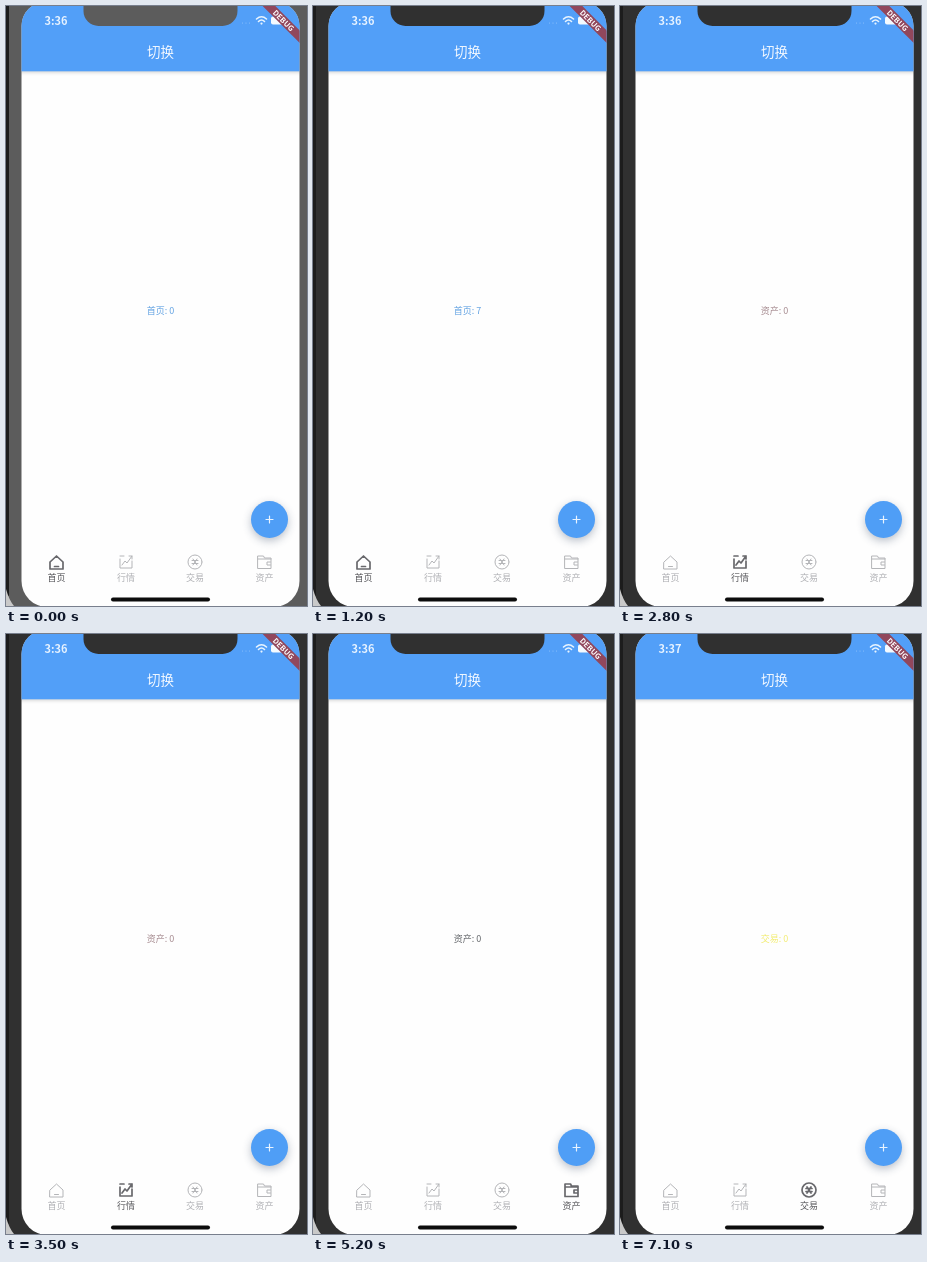
An HTML page with a canvas for the animation above (7200 ms loop, 301 by 600 pixels).

```html
<!DOCTYPE html>
<html lang="zh">
<head>
<meta charset="utf-8">
<style>
html, body { margin: 0; width: 100%; height: 100%; overflow: hidden; background: #303030; }
canvas { display: block; width: 301px; height: 600px; filter: blur(.5px); }
</style>
</head>
<body>
<canvas id="stage" width="301" height="600"></canvas>
<script>
const ctx = document.getElementById('stage').getContext('2d');
const LOOP = 7200;
const FONT = '"Noto Sans CJK SC", "Noto Sans CJK", "Noto Sans", sans-serif';
const BLUE = '#529ff8';

const tabs = [
  { name: '首页', x: 50.5, color: '#62a2e2' },
  { name: '行情', x: 120, color: '#a58a8f', body: '资产: 0' },
  { name: '交易', x: 189, color: '#f2ec70', body: '交易: 0' },
  { name: '资产', x: 258.5, color: '#626569', body: '资产: 0' }
];
const taps = [[0, 0], [2250, 1], [3700, 2], [4700, 3], [6080, 0], [6400, 1], [6620, 2]];

const clamp = v => Math.max(0, Math.min(1, v));

function text(str, x, y, size, color, weight = 400, align = 'center') {
  ctx.font = `${weight} ${size}px ${FONT}`;
  ctx.textAlign = align;
  ctx.textBaseline = 'middle';
  ctx.fillStyle = color;
  ctx.fillText(str, x, y);
}

function disc(x, y, r, color) {
  ctx.fillStyle = color;
  ctx.beginPath();
  ctx.arc(x, y, r, 0, Math.PI * 2);
  ctx.fill();
}

function box(x, y, w, h, r, color) {
  ctx.fillStyle = color;
  ctx.beginPath();
  ctx.roundRect(x, y, w, h, r);
  ctx.fill();
}

function stroke(path, color, width) {
  ctx.strokeStyle = color;
  ctx.lineWidth = width;
  ctx.lineJoin = ctx.lineCap = 'round';
  ctx.stroke(new Path2D(path));
}

// Icon paths are centred on 0,0
const icons = [
  'M-6.5 0 L0 -6 L6.5 0 V7 H-6.5 Z M-2 4.5 H2',
  'M-6 -6 H-2 M-6 -3 V6 H6 V-1 M-4 3 L-1 -1 L1 1 L6 -6 M3 -6 H6 V-3',
  'M7 0 A7 7 0 1 1 -7 0 A7 7 0 1 1 7 0 M-3 -1.5 H3 M-3 1.5 H3 M-2 -3 L2 3 M2 -3 L-2 3',
  'M-6.5 -6 H-1 L0 -4 H6.5 V6.5 H-6.5 Z M-6.5 -3 H6.5 M6 0 H2.5 V3 H6'
];

function drawNav(active, previous, age) {
  const labelled = age > 250 ? active : previous;
  tabs.forEach((tab, i) => {
    const on = i === active;
    ctx.save();
    ctx.translate(tab.x, 556);
    stroke(icons[i], on ? '#68686c' : '#b4b5b8', on ? 1.7 : 1);
    ctx.restore();
    const dark = i === labelled;
    text(tab.name, tab.x, 571.3, 9, dark ? '#58585c' : on ? '#909094' : '#b0b1b5', dark ? 500 : 400);
  });
}

function drawRipple(tab, age) {
  if (age > 480) return;
  const r = 22 * (1 - Math.pow(1 - clamp(age / 200), 2));
  const alpha = 0.065 * (1 - clamp((age - 250) / 230));
  disc(tab.x, 563.5, r, `rgba(0,0,10,${alpha})`);
}

function drawStatus(t) {
  text(t < 6700 ? '3:36' : '3:37', 38.5, 14.5, 11, '#e6f2ff', 600, 'left');
  for (let i = 0; i < 3; i++) disc(236.5 + i * 3.5, 17, 0.6, '#8dc0fa');
  stroke('M250.5 13 Q255.5 8.5 260.5 13 M252.5 15.5 Q255.5 12.5 258.5 15.5', '#e8f4ff', 1.6);
  disc(255.5, 17.6, 1.1, '#e8f4ff');
  box(265, 10.5, 15, 8, 2, '#f4faff');
}

function drawBanner() {
  ctx.save();
  ctx.translate(277.5, 14.5);
  ctx.rotate(Math.PI / 4);
  ctx.fillStyle = '#91475c';
  ctx.fillRect(-40, -4.5, 80, 9);
  text('DEBUG', 0, 0, 7.5, '#fff', 700);
  ctx.restore();
}

function drawFab() {
  ctx.save();
  ctx.shadowColor = 'rgba(40,60,90,.32)';
  ctx.shadowBlur = 9;
  ctx.shadowOffsetY = 3;
  disc(263.5, 513.5, 18.5, '#4f9ef6');
  ctx.restore();
  stroke('M260 513.5 H267 M263.5 510 V517', '#e8f3ff', 1.2);
}

function drawPhone(bezel) {
  ctx.fillStyle = bezel;
  ctx.fillRect(0, 0, 301, 600);
  ctx.fillStyle = '#1c1c1c';
  ctx.fillRect(0, 0, 3, 590);
  ctx.fillStyle = '#c9c9c9';
  ctx.beginPath();
  ctx.moveTo(0, 583);
  ctx.quadraticCurveTo(3, 594, 8, 600);
  ctx.lineTo(0, 600);
  ctx.fill();
}

function draw(t) {
  const index = taps.filter(([time]) => time <= t).length - 1;
  const [start, active] = taps[index];
  const previous = index ? taps[index - 1][1] : active;
  const age = index ? t - start : 1000;
  const tab = tabs[active];
  const tone = Math.round(92 - 44 * clamp((t - 50) / 250));
  const bezel = `rgb(${tone},${tone},${tone})`;
  drawPhone(bezel);

  ctx.save();
  ctx.beginPath();
  ctx.roundRect(15.5, -4, 278, 605, [24, 24, 26, 26]);
  ctx.clip();
  ctx.fillStyle = '#fefefe';
  ctx.fillRect(15, 0, 279, 600);

  ctx.save();
  ctx.shadowColor = 'rgba(0,0,0,.22)';
  ctx.shadowBlur = 4;
  ctx.shadowOffsetY = 1;
  ctx.fillStyle = BLUE;
  ctx.fillRect(10, -5, 290, 70.3);
  ctx.restore();

  text('切换', 154.5, 46, 13.5, '#f4f9ff', 500);
  drawStatus(t);
  drawBanner();

  const count = Math.max(0, Math.min(8, Math.floor((t - 100) / 150)));
  text(tab.body || `首页: ${count}`, 154.5, 304.5, 9, tab.color, 500);
  drawRipple(tab, age);
  drawNav(active, previous, age);
  drawFab();
  box(105, 591.5, 99, 4, 2, '#0c0c0c');
  ctx.restore();

  box(77.5, -15, 154, 35, [0, 0, 15, 15], bezel);
}

function frame(now) {
  draw(Math.floor((now % LOOP) / 100) * 100);
  requestAnimationFrame(frame);
}
requestAnimationFrame(frame);
</script>
</body>
</html>
```
